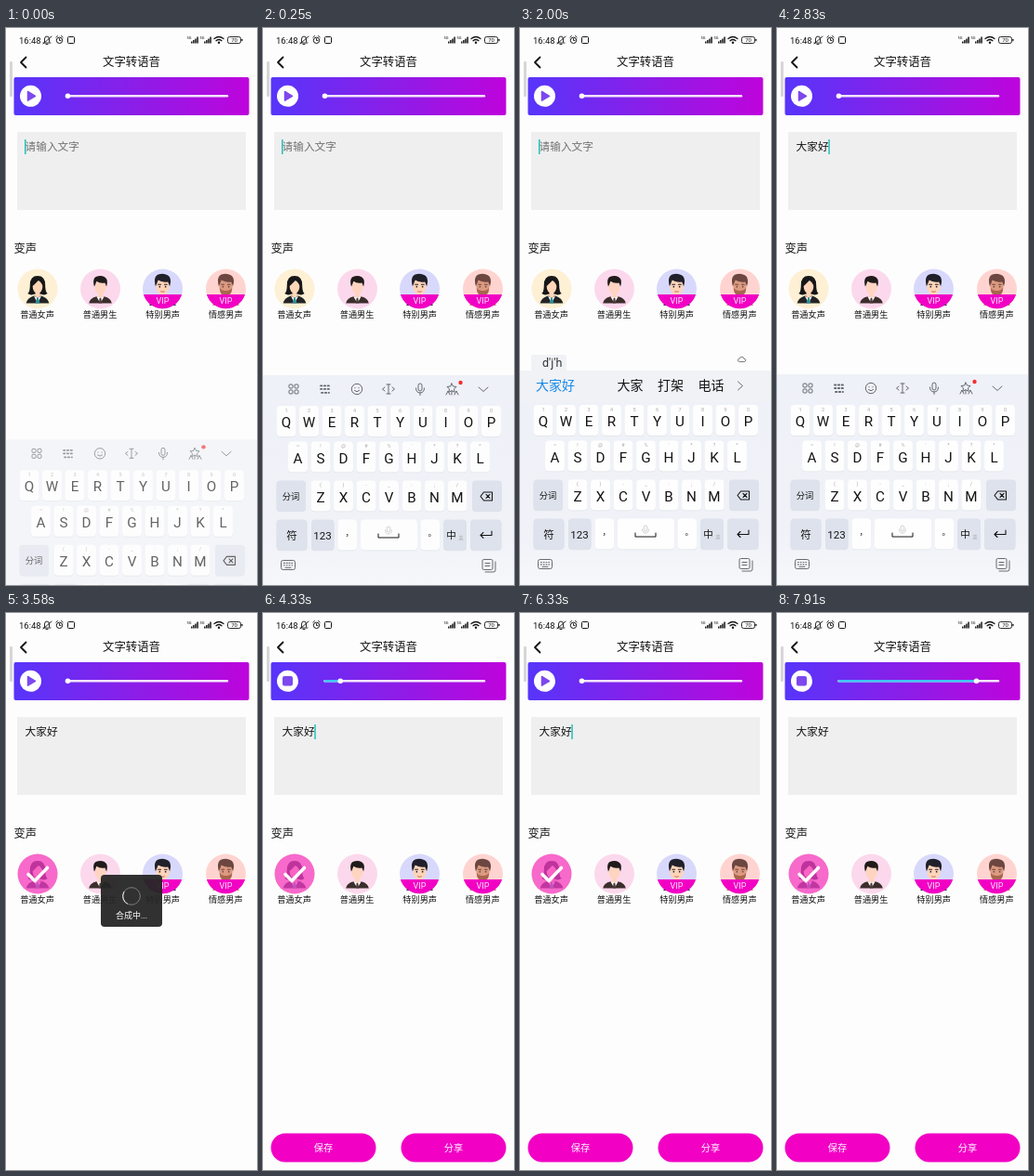
These frames come from a looping animation (270x600 px, 8000 ms). An HTML page:

```html
<!DOCTYPE html>
<html lang="zh-CN">
<head>
<meta charset="utf-8">
<title>文字转语音</title>
<style>
html, body { margin: 0; width: 100%; height: 100%; overflow: hidden; background: #fdfdfd; }
svg { display: block; width: 100vw; height: 100vh; }
text { font-family: Roboto, "Noto Sans CJK SC", "Noto Sans CJK", sans-serif; }
.line { fill: none; stroke-linecap: round; stroke-linejoin: round; }
</style>
</head>
<body>
<svg id="stage" viewBox="0 0 270 600"></svg>
<script>
const LOOP = 8000;
const INK = '#141414', GREY = '#666a70', PINK = '#f200c4', BLUE = '#1688e8', PURPLE = '#7d48ee';
const KEY = '#fefefe', FUNC = '#dde2ec', PRESSED = '#ccd0d8';

const rect = (x, y, w, h, r, fill, extra = '') =>
  `<rect x="${x}" y="${y}" width="${w}" height="${h}" rx="${r}" fill="${fill}" ${extra}/>`;
const circle = (x, y, r, fill, extra = '') =>
  `<circle cx="${x}" cy="${y}" r="${r}" fill="${fill}" ${extra}/>`;
const oval = (x, y, rx, ry, fill) => `<ellipse cx="${x}" cy="${y}" rx="${rx}" ry="${ry}" fill="${fill}"/>`;
const shape = (d, fill) => `<path d="${d}" fill="${fill}"/>`;
const line = (d, color = GREY, width = 1, extra = '') =>
  `<path class="line" d="${d}" stroke="${color}" stroke-width="${width}" ${extra}/>`;
const ring = (x, y, r, color = GREY, width = 1) => circle(x, y, r, 'none', `stroke="${color}" stroke-width="${width}"`);
const frame = (x, y, w, h, r, color = GREY, width = 1) =>
  rect(x, y, w, h, r, 'none', `stroke="${color}" stroke-width="${width}"`);
// y is the visual middle of the glyphs
const text = (x, y, string, size, fill = INK, anchor = 'middle', weight = 400) =>
  `<text x="${x}" y="${y + size * .37}" font-size="${size}" font-weight="${weight}" fill="${fill}" text-anchor="${anchor}">${string}</text>`;
const group = (id, content) => `<g id="${id}">${content}</g>`;
const at = (x, y, content, scale = 1) => `<g transform="translate(${x} ${y}) scale(${scale})">${content}</g>`;

function statusBar() {
  const signal = x => [2, 3.5, 5, 7].map((h, i) => rect(x + 4 + i * 2.1, 16.5 - h, 1.5, h, .3, INK)).join('')
    + text(x + 2, 10.5, '5G', 4);
  return text(14, 13, '16:48', 9.5, INK, 'start')
    + line('M40 16h8M41.5 15v-3q0-3 2.5-3t2.5 3v3M43 17.5h2M40 17l9-8', INK, .9)
    + ring(57.5, 13.3, 3.2, INK) + line('M57.5 11.5v2h1.5M53.8 10l1.7-1.5M61.2 10l-1.7-1.5', INK, .9)
    + frame(66.5, 9.5, 7, 7, 1, INK)
    + signal(195) + signal(209)
    + line('M224 11.5q5-4 10 0M226 13.7q3-2.4 6 0', INK, 1.3) + circle(229, 15.8, 1.2, INK)
    + frame(238.5, 9.5, 14, 7, 2, INK, .9) + rect(253.4, 11.7, 1.1, 2.6, .5, INK) + text(245.5, 13, '70', 6);
}

function person(x, background, hair, skin, suit, vip) {
  const man = shape('M-15 19Q-14 12-5 10L0 13 5 10Q14 12 15 19Z', suit)
    + rect(-3, 4, 6, 8, 2, skin) + shape('M-5 10L0 12 5 10 0 19Z', '#fff') + shape('M-1 12h2l1 7h-4Z', '#4a3837')
    + oval(0, -3, 7.5, 10, skin)
    + shape('M-8-3Q-12-17 0-17 12-16 8-3L6-8Q-1-7-5-10L-7-5Z', hair);
  const woman = shape('M-10-5Q-10-17 0-17T10-5Q10 4 13 6 9 9 5 7H-5Q-9 9-13 6-10 4-10-5Z', hair)
    + shape('M-15 19Q-14 12-5 9H5Q14 12 15 19Z', '#242426')
    + shape('M-5 9L0 12 5 9 0 19Z', '#fff') + shape('M-1 12h2l2 7h-6Z', '#2c9098')
    + rect(-3, 3, 6, 8, 2, skin) + oval(0, -3, 6.5, 9, skin)
    + shape('M-7-3Q-8-14 0-15 8-14 7-3Q5-9 1-11-3-7-7-3Z', hair);
  const face = vip
    ? line('M-5-5h3M2-5h3', hair, 1.2) + circle(-3.3, -2.5, .9, hair) + circle(3.3, -2.5, .9, hair)
      + (vip === 'beard' ? shape('M-7-1Q-4 3 0 2 4 3 7-1 7 8 0 8-7 8-7-1', '#a8664e') : line('M-2 3q2 1 4 0', '#b56d60'))
    : '';
  const badge = vip ? shape('M-20.6 6H20.6A21.5 21.5 0 0 1-20.6 6Z', PINK) + text(0, 13, 'VIP', 9, '#ffe8fb') : '';
  return at(x, 281, circle(0, 0, 21.5, background) + at(0, 0, (suit ? man : woman) + face, vip ? .95 : .82) + badge);
}

function page() {
  const names = ['普通女声', '普通男生', '特别男声', '情感男声'];
  return rect(0, 0, 270, 600, 0, '#fdfdfd') + statusBar()
    + line('M21.5 31.5L16 37l5.5 5.5', INK, 1.8) + text(135, 36.5, '文字转语音', 12.4, INK, 'middle', 500)
    + rect(4, 36, 3, 38, 1, '#d6d6d6')
    + rect(8.5, 53, 253, 41, 2, 'url(#playerFill)') + circle(26.5, 73.3, 11.5, '#fff')
    + group('play', line('M23.5 68.5l8 4.8-8 4.8Z', PURPLE, 1.5) + shape('M23.5 68.5l8 4.8-8 4.8Z', PURPLE))
    + group('stop', rect(21, 68, 11, 10.6, 2, PURPLE))
    + line('M66.5 73.2H238', '#f4e4fc', 2.4)
    + rect(66, 72, 0, 2.4, 1, '#3fc4f4', 'id="played"') + circle(66.5, 73.2, 2.8, '#fff', 'id="thumb"')
    + rect(12, 112, 246, 84, 0, '#efefef')
    + group('hint', text(20.5, 128, '请输入文字', 11.7, '#727272', 'start'))
    + group('entry', text(20.5, 128, '大家好', 11.7, INK, 'start'))
    + rect(20, 120, 1.5, 16, 0, '#27bfb8', 'id="cursor"')
    + text(8.5, 237.5, '变声', 12.3, INK, 'start', 500)
    + person(34, '#fdf0d4', '#171718', '#ffd6b8', '')
    + person(101.5, '#fcd8ec', '#201a1a', '#ffd4c0', '#3b2e2c')
    + person(168.5, '#d8d8fc', '#20202a', '#ffd4b8', '#30304a', 'smile')
    + person(236.5, '#ffd4d0', '#6c4640', '#dc9a80', '#c08878', 'beard')
    + group('chosen', circle(34, 281, 21.5, '#f63cc8', 'opacity=".75"') + line('M24 281.5l7 7 13.5-14', '#fff', 3.6))
    + names.map((name, i) => text(33.5 + i * 67.6, 308.3, name, 9.2, INK, 'middle', 500)).join('')
    + group('actions', [['保存', 65], ['分享', 205]].map(([label, x]) =>
        rect(x - 56.5, 560.5, 113, 31, 15.5, PINK) + text(x, 576, label, 10.2, '#fff')).join(''));
}

const rows = [
  { letters: 'QWERTYUIOP', marks: '1234567890', x: 25, y: 422.5 },
  { letters: 'ASDFGHJKL', marks: '~!@#%\'*?^', x: 37.5, y: 461 },
  { letters: 'ZXCVBNM', marks: '()-_:;/', x: 62, y: 503 },
];
const PITCH = 24.5;
function keyPlace(letter) {
  const row = rows.find(r => r.letters.includes(letter));
  return [row.x + row.letters.indexOf(letter) * PITCH, row.y];
}

function keyboard() {
  const key = (x, y, w, fill, extra) => rect(x, y - 15.7, w, 33, 4, '#dfe2e8')
    + rect(x, y - 16.5, w, 33, 4, fill, extra);
  const letters = rows.map(({ letters, marks, x, y }) => [...letters].map((letter, i) => {
    const cx = x + i * PITCH;
    return key(cx - 10.4, y, 20.8, KEY, `id="key${letter}"`)
      + text(cx, y - 12, marks[i], 5.5, '#a8a8ac') + text(cx, y + 1, letter, 15.2);
  }).join('')).join('');
  const tools = at(33, 388, [[-5, -5], [1, -5], [-5, 1], [1, 1]].map(([x, y]) => frame(x, y, 4, 4, 1)).join(''))
    + at(67, 388, line('M-5-3.5H5M-5 0H5M-4 4H4', GREY, 1.8, 'stroke-dasharray="1.4 2.4"'))
    + at(101, 388, ring(0, 0, 5.7) + line('M-2-1.5v.3M2-1.5v.3M-2.6 1.6q2.6 2.6 5.2 0'))
    + at(135, 388, line('M-2-5H2M0-5V5M-2 5H2M-4-2l-2.5 2L-4 2M4-2l2.5 2L4 2'))
    + at(169, 388, frame(-2, -6, 4, 8, 2) + line('M-4.5-1q0 5 4.5 5t4.5-5M0 4v2.5'))
    + at(203, 388, line('M0-6l1.5 3 3.5.5-2.5 2.5.6 3.3L0 1.7l-3.1 1.6.6-3.3L-5-2.5l3.5-.5Z')
      + line('M-6 6l2-4 2 4M0 2v4M3 6l2-4 2 4'))
    + circle(212.5, 381, 2.2, '#f52e30') + line('M232 386l5 4.5 5-4.5');
  const candidates = rect(12, 352, 38, 19, 2, '#f0f2f6') + rect(0, 369, 270, 34, 0, '#f0f2f6')
    + '<text id="pinyin" x="24" y="365" font-size="12.5" fill="#333"></text>'
    + line('M236 359.5q-2-.3-1.7-2 .4-1.5 1.8-1.2.6-2.2 2.8-2 1.8.2 2.1 2 1.9.1 1.8 1.8-.2 1.3-1.5 1.4Z', GREY, .9)
    + [38, 81, 118.5, 162, 205.5].map((x, i) =>
        `<text class="word" x="${x}" y="390.2" font-size="14" text-anchor="middle" fill="${i ? INK : BLUE}"></text>`).join('')
    + line('M234.5 381l5 4.5-5 4.5');
  return rect(0, 373, 270, 227, 0, 'url(#boardFill)')
    + group('tools', tools) + group('candidates', candidates) + letters
    + key(14.5, 503, 31.5, FUNC) + text(30, 503.5, '分词', 9.3)
    + key(225, 503, 32, FUNC) + line('M234 503.5l3.5-4.5h9v9h-9ZM240 501.5l4 4M244 501.5l-4 4', INK, 1.1)
    + key(14.5, 545, 33, FUNC) + text(31, 545.5, '符', 11.5)
    + key(52, 545, 24.5, FUNC) + text(64, 545.5, '123', 11.5)
    + key(80.5, 545, 20.5, KEY) + text(93, 543, '，', 9)
    + key(105, 545, 61, KEY) + line('M124 544v4h22v-4', INK)
    + frame(133.2, 536, 3.6, 6, 1.8, '#c4c4c8', .8) + line('M131.5 540q0 4 3.5 4t3.5-4', '#c4c4c8', .8)
    + key(169.5, 545, 20.5, KEY) + text(182, 543, '。', 9)
    + key(194, 545, 25, FUNC) + text(202.5, 545.5, '中', 10.5) + text(213, 548, '英', 5, '#a4a8b0')
    + key(223, 545, 33.5, FUNC) + line('M246 541v4.5h-12M237 542.5l-3 3 3 3', INK, 1.1)
    + frame(19.5, 572.5, 15, 10, 2) + line('M22.5 575.5h9M22.5 577.8h9', GREY, 1.2, 'stroke-dasharray=".8 2"')
    + line('M24 580.3h6')
    + frame(236, 571.5, 11, 11, 1.5) + line('M239 585h9q2 0 2-2v-9M239 575.5h5M239 578.5h5')
    + group('popup', rect(-22, -19, 44, 36, 6, KEY, 'stroke="#e2e4ea" stroke-width=".8"') + text(0, 0, '', 18, BLUE));
}

const dialog = rect(102, 282, 66, 56, 4, '#262626', 'opacity=".95"') + ring(135, 305, 9.3, '#858585', .9)
  + '<g id="spinner">' + line('M135 295.7a9.3 9.3 0 0 1 9.3 9.3', '#e8e8e8') + '</g>'
  + text(135, 325.5, '合成中...', 9, '#fff');

const stage = document.getElementById('stage');
stage.innerHTML = `<defs>
  <linearGradient id="playerFill"><stop stop-color="#5735fa"/><stop offset=".5" stop-color="#8a1ee8"/><stop offset="1" stop-color="#be04dc"/></linearGradient>
  <linearGradient id="boardFill" x2="0" y2="1"><stop stop-color="#eef1f7"/><stop offset=".75" stop-color="#f0f2f8"/><stop offset="1" stop-color="#f6f7fa"/></linearGradient>
  </defs>` + page() + group('keyboard', keyboard()) + group('dialog', dialog);

const $ = id => document.getElementById(id);
const words = [...document.querySelectorAll('.word')];
const show = (id, visible) => $(id).setAttribute('display', visible ? 'inline' : 'none');
const clamp = v => Math.max(0, Math.min(1, v));

const presses = [
  { time: 620, letter: 'D', pinyin: 'd', words: ['的', '都', '大', '到', '对'] },
  { time: 1080, letter: 'J', pinyin: "d'j", words: ['大家', 'DJ', '打劫', '电竞', '多久'] },
  { time: 1580, letter: 'H', pinyin: "d'j'h", words: ['大家好', '', '大家', '打架', '电话'] },
];
const COMMIT = 2330, HIDE = 2930, SELECT = 3330, READY = 4120;
const PLAY_TIME = 1500, plays = [4185, 6620];

function draw(t) {
  const typed = presses.filter(p => t >= p.time).pop();
  const composing = typed && t < COMMIT;
  const pressed = presses.find(p => t >= p.time && t < p.time + 170);
  const busy = t >= SELECT + 70 && t < READY;
  const written = t >= COMMIT;

  const hidden = (1 - clamp(t / 330)) ** 3;
  const leaving = clamp((t - HIDE) / 270) ** 2;
  $('keyboard').setAttribute('transform', `translate(0 ${71 * hidden + 235 * leaving})`);
  $('keyboard').setAttribute('opacity', 1 - .35 * hidden - leaving);
  show('tools', !composing);
  show('candidates', composing);
  if (composing) {
    $('pinyin').textContent = typed.pinyin;
    words.forEach((word, i) => word.textContent = typed.words[i]);
  }
  presses.forEach(p => $('key' + p.letter).setAttribute('fill', p === pressed ? PRESSED : KEY));
  show('popup', pressed);
  if (pressed) {
    const [x, y] = keyPlace(pressed.letter);
    $('popup').setAttribute('transform', `translate(${x} ${y - 39})`);
    $('popup').querySelector('text').textContent = pressed.letter;
  }

  show('hint', !written);
  show('entry', written);
  show('cursor', !busy && (t % 1000 < 500 || t >= COMMIT && t < 3000));
  $('cursor').setAttribute('x', written ? 55.3 : 20);
  show('chosen', t >= SELECT);
  show('actions', t >= READY);
  show('dialog', busy);
  $('spinner').setAttribute('transform', `rotate(${t * .36} 135 305)`);

  const start = plays.find(time => t >= time && t < time + PLAY_TIME);
  const length = start ? 172 * (t - start) / PLAY_TIME : 0;
  show('play', !start);
  show('stop', start);
  $('played').setAttribute('width', length);
  $('thumb').setAttribute('cx', 66.5 + length);
}

function tick() {
  draw(performance.now() % LOOP);
  requestAnimationFrame(tick);
}
tick();
</script>
</body>
</html>
```
